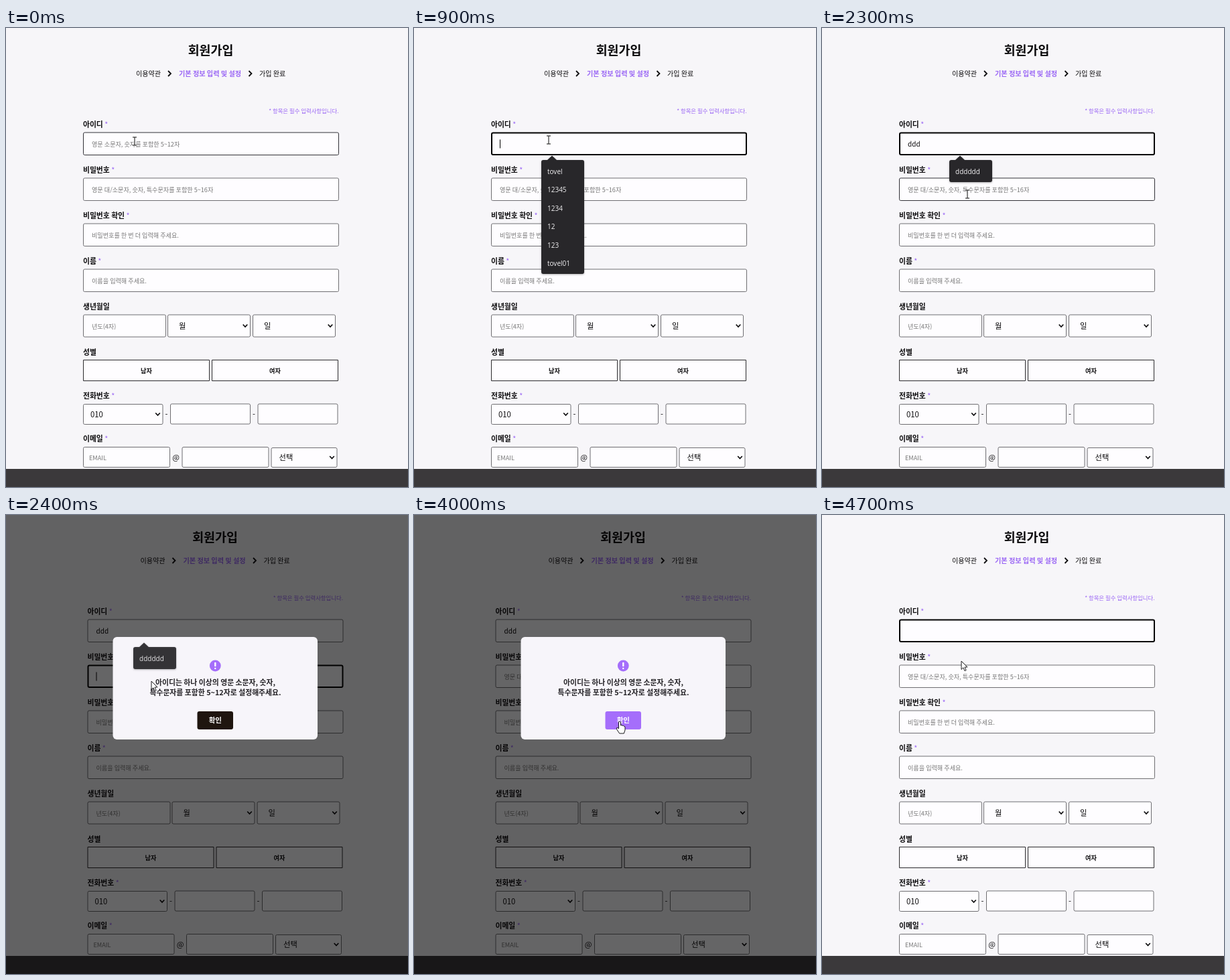
An HTML page with a canvas for the animation above (5000 ms loop, 600x685 px).

```html
<!DOCTYPE html>
<html lang="ko">
<head>
<meta charset="utf-8">
<title>회원가입</title>
<style>
  html, body { margin: 0; width: 100%; height: 100%; overflow: hidden; background: #f7f6f9; }
  canvas { display: block; width: 600px; height: 685px; }
</style>
</head>
<body>
<canvas id="stage" width="600" height="685"></canvas>
<script>
const ctx = document.getElementById('stage').getContext('2d');
const LOOP = 5000, STEP = 100;
const SANS = '"Noto Sans CJK KR", "Noto Sans CJK", "Noto Sans", sans-serif';
const MENU = '"Open Sans", "Noto Sans", sans-serif';
const PAGE = '#f7f6f9', INK = '#0c0b0d', PURPLE = '#9a66f5', ACCENT = '#a56efb', GREY = '#777', BORDER = '#6f6e72';

const MODAL_FROM = 2400, MODAL_TO = 4100, HOVER_BUTTON = 3100;
const BUTTON = { x: 285.5, y: 293, w: 53.5, h: 27 };
const FOCUS = [[0, null], [700, 'id'], [2400, 'pw'], [3900, null], [4100, 'id']];
const TYPED = [[0, ''], [1200, 'd'], [1300, 'dd'], [1400, 'ddd'], [4100, '']];
const PATH = [
  [0, 192, 169], [600, 201, 167], [1500, 201, 167], [2100, 217, 248],
  [2600, 217, 248], [3200, 307, 308], [4100, 307, 308], [4400, 208, 218], [LOOP, 208, 218]
];
const HISTORY = ['tovel', '12345', '1234', '12', '123', 'tovel01'];

const FIELDS = [
  { id: 'id', x: 115, y: 155.5, w: 382, h: 34.5, hint: '영문 소문자, 숫자를 포함한 5~12자' },
  { id: 'pw', x: 115, y: 223.5, w: 382, h: 34.5, hint: '영문 대/소문자, 숫자, 특수문자를 포함한 5~16자' },
  { id: 'confirm', x: 115, y: 291.5, w: 382, h: 34.5, hint: '비밀번호를 한 번 더 입력해 주세요.' },
  { id: 'name', x: 115, y: 359.5, w: 382, h: 34.5, hint: '이름을 입력해 주세요.' },
  { id: 'year', x: 115, y: 427.5, w: 124, h: 34, hint: '년도(4자)' },
  { id: 'phone2', x: 245, y: 560.5, w: 120, h: 31 },
  { id: 'phone3', x: 375.5, y: 560.5, w: 120, h: 31 },
  { id: 'mail', x: 115, y: 625, w: 130, h: 31, hint: 'EMAIL', pad: 9 },
  { id: 'host', x: 262.5, y: 625, w: 130, h: 31 }
];
const SELECTS = [
  [241, 427.5, 124, 34, '월', 17], [368, 427.5, 124, 34, '일', 17],
  [115, 561, 119.5, 31, '010', 11], [395.5, 626, 99, 30, '선택', 12]
];
const LABELS = [
  ['아이디', 144, 1], ['비밀번호', 212, 1], ['비밀번호 확인', 280, 1], ['이름', 348, 1],
  ['생년월일', 416, 0], ['성별', 484, 0], ['전화번호', 549, 1], ['이메일', 613, 1]
];

const latest = (list, t) => list.filter(([at]) => at <= t).pop();
const inside = (p, r) => p.x >= r.x && p.x <= r.x + r.w && p.y >= r.y && p.y <= r.y + r.h;

// The y argument is the optical middle of the line.
function text(str, x, y, size, { color = INK, weight = 400, align = 'left', family = SANS } = {}) {
  ctx.font = `${weight} ${size}px ${family}`;
  ctx.fillStyle = color;
  ctx.textAlign = align;
  ctx.fillText(str, x, y + size * 0.37);
  return ctx.measureText(str).width;
}

function box(x, y, w, h, r, fill, stroke, line = 1) {
  const inset = stroke ? line / 2 : 0;
  ctx.beginPath();
  ctx.roundRect(x + inset, y + inset, w - 2 * inset, h - 2 * inset, r);
  ctx.fillStyle = fill;
  ctx.fill();
  if (stroke) {
    ctx.strokeStyle = stroke;
    ctx.lineWidth = line;
    ctx.stroke();
  }
}

function polyline(points, width, color = INK) {
  ctx.beginPath();
  points.forEach(([x, y]) => ctx.lineTo(x, y));
  ctx.strokeStyle = color;
  ctx.lineWidth = width;
  ctx.stroke();
}

function pointerAt(t) {
  const i = PATH.findIndex(([at]) => at > t);
  const [t0, x0, y0] = PATH[i - 1], [t1, x1, y1] = PATH[i];
  const u = (t - t0) / (t1 - t0), e = u * u * (3 - 2 * u);
  return { x: x0 + (x1 - x0) * e, y: y0 + (y1 - y0) * e };
}

function drawHeader() {
  text('회원가입', 305.5, 33, 18.4, { weight: 700, align: 'center' });
  text('이용약관', 194, 68, 10.1);
  text('기본 정보 입력 및 설정', 304.5, 68, 10.15, { weight: 700, align: 'center', color: PURPLE });
  text('가입 완료', 378, 68, 10.1);
  for (const x of [242, 362.5]) polyline([[x, 64], [x + 4, 68], [x, 72]], 1.8);
  text('* 항목은 필수 입력사항입니다.', 496.5, 124, 8.4, { color: PURPLE, align: 'right' });
}

function drawField(f, state) {
  const focused = state.focus === f.id;
  const value = f.id === 'id' ? state.value : '';
  const hovered = !state.modal && inside(state.pointer, f);
  box(f.x, f.y, f.w, f.h, 2, '#fefdff', focused ? '#000' : hovered ? '#333238' : BORDER, focused ? 2 : 1);
  const x = f.x + (f.pad || 13), y = f.y + f.h / 2 + 0.7;
  let end = x;
  if (value) end += text(value, x, y, 10);
  else if (f.hint && !focused) text(f.hint, x, y + 0.5, 9.1, { color: GREY });
  if (focused && state.caret) {
    ctx.fillStyle = '#000';
    ctx.fillRect(Math.round(end), y - 7, 1, 13);
  }
}

function drawForm(state) {
  for (const [label, y, required] of LABELS) {
    const w = text(label + ' ', 115, y, 10.8, { weight: 700 });
    if (required) text('*', 115 + w, y, 10.8, { color: PURPLE });
  }
  FIELDS.forEach(f => drawField(f, state));
  for (const [x, y, w, h, label, pad] of SELECTS) {
    box(x, y, w, h, 2, '#fefdff', BORDER);
    text(label, x + pad, y + h / 2 + 0.3, 11.3);
    const cx = x + w - 8, cy = y + h / 2;
    polyline([[cx - 3.3, cy - 2], [cx, cy + 1.5], [cx + 3.3, cy - 2]], 1.7);
  }
  [[115, '남자'], [307, '여자']].forEach(([x, label]) => {
    box(x, 495, 189, 32, 0, '#fefdff', '#2c2b2e');
    text(label, x + 94.5, 511.5, 9.2, { weight: 700, align: 'center' });
  });
  for (const x of [239.5, 370]) text('-', x, 576, 11.3, { align: 'center' });
  text('@', 253.5, 641, 11.3, { align: 'center' });
}

function drawModal(hot) {
  box(159.5, 182, 305.5, 153, 6, '#f7f5fa');
  ctx.beginPath();
  ctx.arc(312.3, 225, 8.4, 0, Math.PI * 2);
  ctx.fillStyle = ACCENT;
  ctx.fill();
  box(311.1, 219.8, 2.4, 6.4, 1, '#fff');
  box(311.1, 227.8, 2.4, 2.4, 1.2, '#fff');
  const style = { weight: 700, align: 'center', color: '#242226' };
  text('아이디는 하나 이상의 영문 소문자, 숫자,', 312.5, 249.5, 10.85, style);
  text('특수문자를 포함한 5~12자로 설정해주세요.', 312.5, 265, 10.85, style);
  box(BUTTON.x, BUTTON.y, BUTTON.w, BUTTON.h, 3, hot ? ACCENT : '#1f150f');
  text('확인', 312.3, 306.5, 10.5, { weight: 700, align: 'center', color: '#fff' });
}

function drawSuggestions(items, alpha) {
  ctx.save();
  ctx.globalAlpha = alpha;
  ctx.shadowColor = 'rgba(0,0,0,.3)';
  ctx.shadowBlur = 3;
  ctx.shadowOffsetY = 1;
  const h = 33 + (items.length - 1) * 27.4;
  ctx.beginPath();
  ctx.roundRect(190, 197, 64, h, 3);
  ctx.moveTo(199, 197);
  ctx.lineTo(206, 190.5);
  ctx.lineTo(213, 197);
  ctx.fillStyle = '#28272a';
  ctx.fill();
  ctx.shadowColor = 'transparent';
  items.forEach((item, i) => text(item, 199, 214 + i * 27.45, 10, { color: '#f2f1f3', family: MENU }));
  ctx.restore();
}

const SHAPES = {
  arrow: new Path2D('M0 0V12.5L2.9 9.8L5 14.6L7.1 13.7L5 9H9Z'),
  hand: new Path2D('M-1.5 .8Q0-.8 1.5 .8V6Q3 5 4.2 6.4Q5.6 5.8 6.5 7.2Q8 7 8 9V13L6.3 18H-.3L-4.6 11.5Q-5.2 9-3 9.4L-1.5 11Z')
};

function drawPointer({ x, y }, kind) {
  ctx.save();
  ctx.translate(x, y);
  if (kind === 'beam') {
    for (const [width, color] of [[2.4, 'rgba(255,255,255,.75)'], [1.1, '#222']]) {
      polyline([[-3, -6], [3, -6]], width, color);
      polyline([[0, -6], [0, 6]], width, color);
      polyline([[-3, 6], [3, 6]], width, color);
    }
  } else {
    ctx.fillStyle = '#fff';
    ctx.strokeStyle = '#1b1a1d';
    ctx.lineWidth = 1;
    ctx.fill(SHAPES[kind]);
    ctx.stroke(SHAPES[kind]);
  }
  ctx.restore();
}

function render(t) {
  const [focusAt, focus] = latest(FOCUS, t);
  const [typedAt, value] = latest(TYPED, t);
  const state = {
    focus, value,
    pointer: pointerAt(t),
    modal: t >= MODAL_FROM && t < MODAL_TO,
    caret: (t - Math.max(focusAt, typedAt)) % 1000 < 500
  };
  const hot = state.modal && t >= HOVER_BUTTON;

  ctx.fillStyle = PAGE;
  ctx.fillRect(0, 0, 600, 685);
  ctx.save();
  if (state.modal) ctx.translate(6.5, 0); // the scrollbar is gone while the dialog is open
  drawHeader();
  drawForm(state);
  ctx.restore();
  ctx.fillStyle = '#3b393b';
  ctx.fillRect(0, 658, 600, 27);

  if (state.modal) {
    ctx.fillStyle = 'rgba(0,0,0,.6)';
    ctx.fillRect(0, 0, 600, 685);
    drawModal(hot);
  }
  if (t >= 700 && t < 2500) {
    drawSuggestions(value ? ['dddddd'] : HISTORY, state.modal ? 0.91 : 1);
  }
  const overField = !state.modal && FIELDS.some(f => inside(state.pointer, f));
  drawPointer(state.pointer, hot ? 'hand' : overField ? 'beam' : 'arrow');
}

function tick() {
  const t = performance.now() % LOOP;
  render(Math.floor(t / STEP) * STEP);
  requestAnimationFrame(tick);
}
tick();
</script>
</body>
</html>
```
